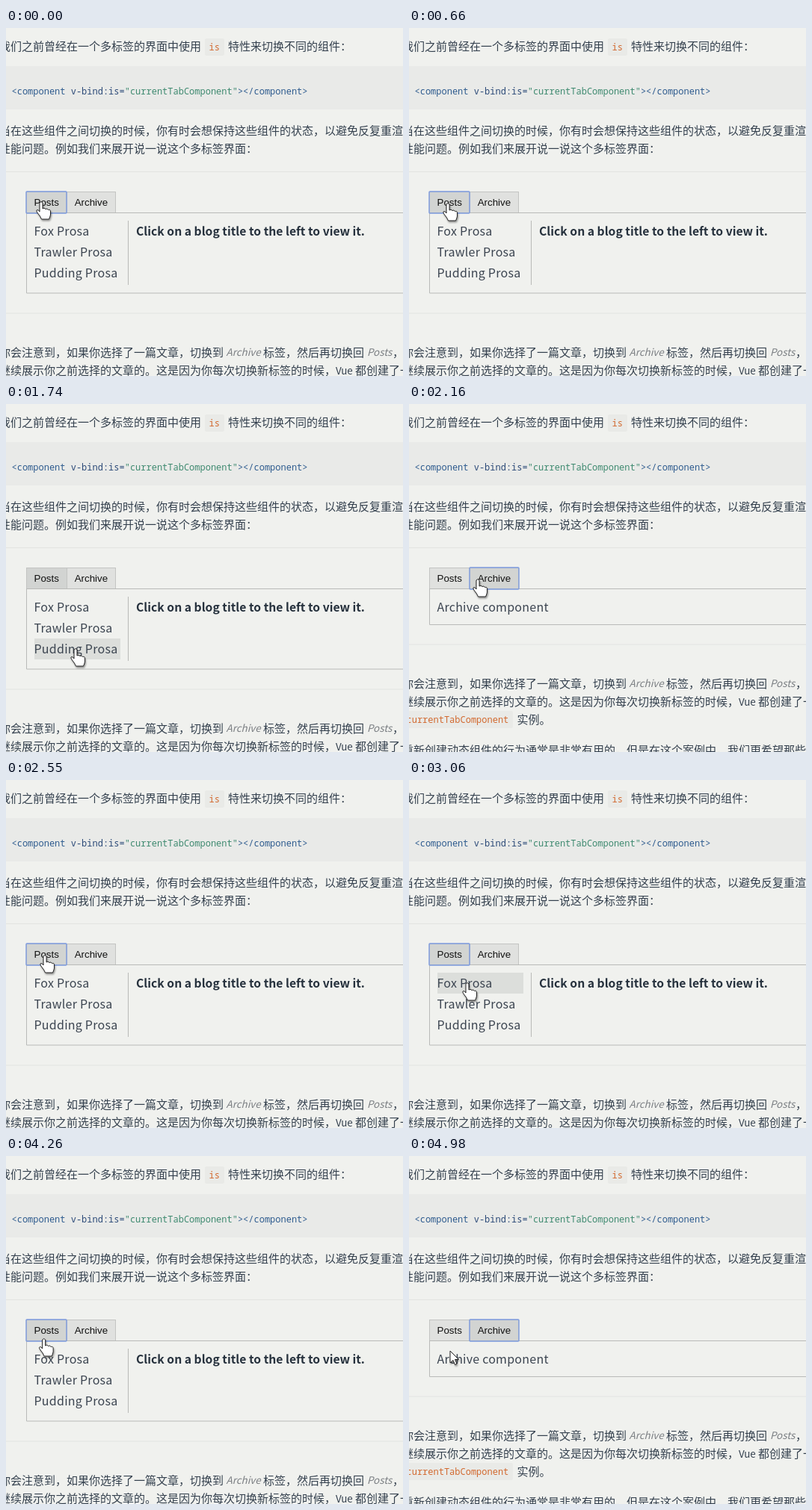
An HTML page that plays this animation: 531 by 466 pixels, repeating every 5.08 s.

```html
<!DOCTYPE html>
<html lang="zh-CN">
<head>
<meta charset="utf-8">
<title>Tabs</title>
<style>
html, body { margin: 0; width: 100%; height: 100%; overflow: hidden; background: #f0f1ee; }
svg { display: block; width: 531px; height: 466px; }
text { font: 15px "Noto Sans CJK SC", "Noto Sans", sans-serif; fill: #34404e; white-space: pre; }
.latin { font-size: 13.4px; }
.em { font-style: italic; fill: #7b7f83; }
.code { font: 12px "Roboto Mono", "Noto Sans Mono", monospace; fill: #2f5c8f; }
.attr { fill: #2c4a78; }
.str { fill: #3f8a70; }
.hot { fill: #d2692f; }
.demo { font-size: 16px; letter-spacing: .24px; fill: #3b4450; }
.head { font-size: 15.7px; font-weight: bold; fill: #26313d; }
.title { font-size: 18.5px; }
.btn { font: 13.333px "Liberation Sans", Arial, sans-serif; fill: #111; }
.line { fill: none; stroke: #b9bab8; }
.rule { stroke: #e2e3e1; }
.tab { fill: #e0e1df; stroke: #c3c4c2; }
.tab.on { fill: #d2d4d2; }
.ring { fill: none; stroke: #7c9ade; stroke-width: 1.4; }
.tip { stroke: #222; stroke-linejoin: round; fill: #fff; filter: drop-shadow(1px 2px 1px rgba(0,0,0,.4)); }
</style>
</head>
<body>
<svg viewBox="0 0 531 466" xmlns="http://www.w3.org/2000/svg">
  <text x="-9" y="29.5">我们之前曾经在一个多标签的界面中使用</text>
  <rect x="266" y="14" width="26" height="23" rx="2" fill="#e9eae7"/>
  <text class="code hot" x="271.5" y="30">is</text>
  <text x="297" y="29.5">特性来切换不同的组件：</text>
  <rect y="51" width="531" height="58" fill="#e9eae8"/>
  <text class="code" x="7.5" y="89">&lt;component <tspan class="attr">v-bind:is=</tspan><tspan class="str">"currentTabComponent"</tspan>&gt;&lt;/component&gt;</text>
  <text x="-9" y="142.5">当在这些组件之间切换的时候，你有时会想保持这些组件的状态，以避免反复重渲</text>
  <text x="-9" y="166.5">性能问题。例如我们来展开说一说这个多标签界面：</text>
  <path class="rule" d="M0 192.5H531"/>

  <rect class="tab" id="tab0" x="27.5" y="219.5" width="54" height="28"/>
  <rect class="tab" id="tab1" x="81.5" y="219.5" width="65" height="28"/>
  <path class="line" id="panel"/>
  <rect class="ring" id="ring" y="219" height="29" rx="1"/>
  <text class="btn" x="37.5" y="238">Posts</text>
  <text class="btn" x="91.7" y="238">Archive</text>

  <text class="demo" id="archive" x="37.5" y="278">Archive component</text>
  <g id="posts">
    <rect id="picked" x="38" y="258" width="115" height="28" fill="#a0c3da"/>
    <rect id="hover" x="38" width="115" height="28" fill="#dcdedb"/>
    <g id="list"></g>
    <path class="line" id="divider"/>
    <text class="head" id="hint" x="174" y="278">Click on a blog title to the left to view it.</text>
    <g id="story"></g>
  </g>

  <g id="foot">
    <path class="rule" d="M0 382H531"/>
    <text x="-9" y="439.5">你会注意到，如果你选择了一篇文章，切换到</text>
    <text class="latin em" x="294.5" y="439">Archive</text>
    <text x="344" y="439.5">标签，然后再切换回</text>
    <text class="latin em" x="483" y="439">Posts</text>
    <text x="517" y="439.5">，</text>
    <text x="-9" y="463.5">继续展示你之前选择的文章的。这是因为你每次切换新标签的时候，</text>
    <text class="latin" x="441" y="463.5">Vue</text>
    <text x="467" y="463.5">都创建了一个新的</text>
    <rect x="-8" y="471" width="147" height="23" rx="2" fill="#e9eae7"/>
    <text class="code hot" x="-3.5" y="487">currentTabComponent</text>
    <text x="144.5" y="487.5">实例。</text>
    <text x="-9" y="528.5">重新创建动态组件的行为通常是非常有用的，但是在这个案例中，我们更希望那些标</text>
  </g>

  <g id="cursor">
    <path class="tip" id="hand" d="M-2 1Q0-2 2 1V9Q4 7 6 9.5Q8 8 9.5 10.5Q12.5 9.5 12.5 13V17Q12 20 10.5 23H.5Q-1 19-4.5 15Q-7.5 11-5 10.5Q-3.5 10.5-2 13Z"/>
    <path class="tip" id="arrow" d="M0 0V16L4 12.5L6.5 18.5L9 17.4L6.5 11.5H11.5Z"/>
  </g>
</svg>
<script>
const $ = id => document.getElementById(id);
const show = (id, on) => $(id).setAttribute('display', on ? 'inline' : 'none');
const set = (id, attrs) => {
  for (const k in attrs) $(id).setAttribute(k, attrs[k]);
};
function addText(parent, x, y, cls, str) {
  const el = document.createElementNS('http://www.w3.org/2000/svg', 'text');
  el.setAttribute('x', x);
  el.setAttribute('y', y);
  el.setAttribute('class', cls);
  el.textContent = str;
  $(parent).append(el);
}

const ROW = 28, LIST_TOP = 258;
const titles = ['Fox Prosa', 'Trawler Prosa', 'Pudding Prosa'];
const story = [
  'Dont wait for the storm to pass, dance in the',
  'rain kick up litter decide to want nothing to do',
  'with my owner today demand to be let outside',
  'at once, and expect owner to wait for me as i',
  'think about it cat cat moo moo lick ears lick',
  'paws so make meme, make cute face but lick'
];
titles.forEach((s, i) => addText('list', 37.5, 278 + ROW * i, 'demo', s));
addText('story', 174, 277.5, 'head title', titles[0]);
story.forEach((s, i) => addText('story', 174, 324 + ROW * i, 'demo', s));

// The screen refreshes in even steps
const LOOP = 5080, STEP = 133.5, LEAD = 27;

// Pointer stops: step, place, and the view from then on
const postsTab = [52, 235], archiveTab = [96, 235];
const stops = [
  [0, [47, 233], 'posts'],
  [3, archiveTab, 'archive'],
  [5, postsTab, 'posts'],
  [7, archiveTab, 'archive'],
  [8, [106, 234], 'archive'],
  [10, postsTab, 'posts'],
  [13, [93, 328], 'idle'],
  [16, [92, 235], 'archive'],
  [19, postsTab, 'posts'],
  [23, [78, 272], 'posts'],
  [25, [96, 276], 'story'],
  [27, [98, 281], 'story'],
  [28, archiveTab, 'archive'],
  [30, postsTab, 'posts'],
  [33, [50, 250], 'posts'],
  [35, archiveTab, 'archive'],
  [37, [55, 261], 'archive']
];

function stateAt(step) {
  const i = stops.findLastIndex(s => s[0] <= step);
  const [from, a, view] = stops[i];
  const [to, b] = stops[i + 1] || [from + 1, a];
  const k = (step - from) / (to - from);
  return { view, x: a[0] + (b[0] - a[0]) * k, y: a[1] + (b[1] - a[1]) * k };
}

function draw(step) {
  const { view, x, y } = stateAt(step);
  const isArchive = view === 'archive', isStory = view === 'story';
  const bottom = isStory ? 480 : isArchive ? 295.5 : 355;

  show('archive', isArchive);
  show('posts', !isArchive);
  show('hint', !isStory);
  show('story', isStory);
  show('picked', isStory);
  show('foot', !isStory);
  set('foot', { transform: `translate(0 ${isArchive ? -60 : 0})` });
  set('panel', { d: `M540 247.5H27.5V${bottom}H540` });
  set('divider', { d: `M163.5 258V${isStory ? 480 : 344}` });
  set('tab0', { class: isArchive ? 'tab' : 'tab on' });
  set('tab1', { class: isArchive ? 'tab on' : 'tab' });
  set('ring', { x: isArchive ? 81 : 27, width: isArchive ? 66 : 54 });
  show('ring', isArchive || view === 'posts');

  const row = Math.floor((y - LIST_TOP) / ROW);
  const onItem = !isArchive && x > 38 && x < 153 && row >= 0 && row < titles.length;
  const onTab = y >= 219 && y < 248;
  show('hover', onItem && !(isStory && row === 0));
  set('hover', { y: LIST_TOP + ROW * row });
  show('hand', onItem || onTab);
  show('arrow', !onItem && !onTab);
  set('cursor', { transform: `translate(${x} ${y})` });
}

const start = performance.now();
let last = -1;
function loop() {
  const t = (performance.now() - start) % LOOP;
  const step = Math.floor((t + LEAD) / STEP);
  if (step !== last) draw(last = step);
  requestAnimationFrame(loop);
}
loop();
</script>
</body>
</html>
```
